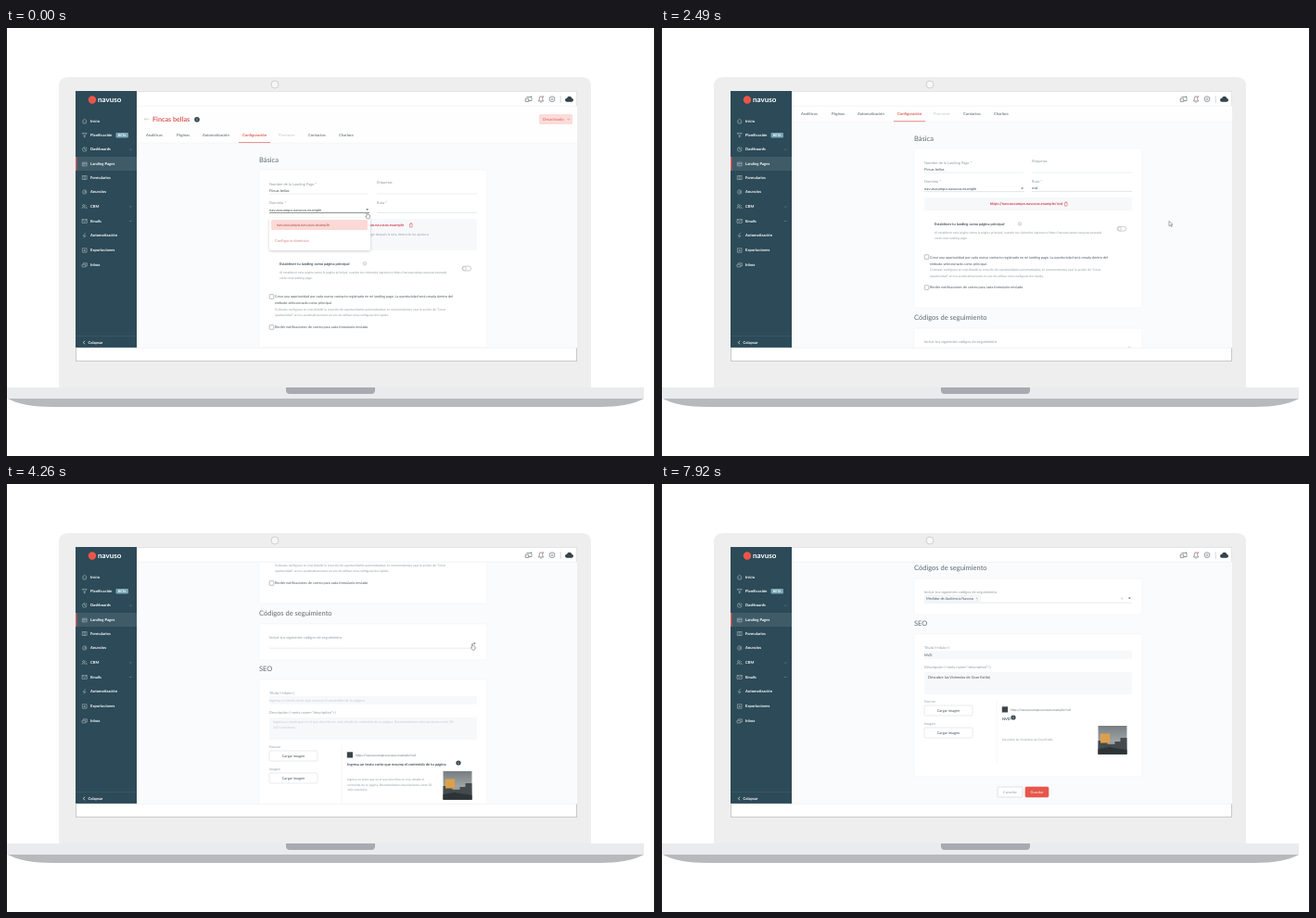
An HTML page for the animation above (8 s loop, 700 px wide and 462 px high).

```html
<!DOCTYPE html>
<html lang="es">
<head>
<meta charset="utf-8">
<style>
html, body { margin: 0; width: 100%; height: 100%; overflow: hidden; background: #fff }
svg { display: block; font-family: Lato, "Open Sans", sans-serif; text-rendering: geometricPrecision }
text { white-space: pre }
</style>
</head>
<body>
<svg id="stage" width="700" height="462" viewBox="0 0 700 462"></svg>
<script>
const RED = '#df5a55', INK = '#4a555c', GREY = '#929ba1', PALE = '#c3cad0';
const HOST = 'navusocampo.navusos.example', SITE = 'https://' + HOST;
const PROJECT = 'Fincas bellas', PATH = 'nvd', TITLE = 'NVD';
const TRACKER = 'Medidor de Audiencia Navuso';
const PITCH = 'Descubre las Viviendas de Gran Estilo';
const TITLE_HINT = 'Ingresa un texto corto que resuma el contenido de tu página';

const esc = s => s.replace(/&/g, '&amp;').replace(/</g, '&lt;');
// y is the vertical middle of the line
const text = (x, y, s, size = 3.9, fill = INK, more = '') =>
  `<text x="${x}" y="${y + size * .34}" font-size="${size}" fill="${fill}" ${more}>${esc(s)}</text>`;
const rect = (x, y, w, h, fill, more = '') =>
  `<rect x="${x}" y="${y}" width="${w}" height="${h}" fill="${fill}" ${more}/>`;
const line = (d, color = GREY, w = .6, more = '') =>
  `<path d="${d}" fill="none" stroke="${color}" stroke-width="${w}" ${more}/>`;
const dot = (x, y, r, fill, more = '') => `<circle cx="${x}" cy="${y}" r="${r}" fill="${fill}" ${more}/>`;
const group = (id, body) => `<g id="${id}">${body}</g>`;
const card = (y, h, id = '') => rect(273, y, 246, h, '#fff', `id="${id}" rx="2" stroke="#f1f3f5" stroke-width=".6"`);
const arrow = (x, y) => `<path d="M${x - 1.4} ${y - .7}h2.8l-1.4 1.7z" fill="#5c666c"/>`;
const info = (x, y, r, id = '') => `<g id="${id}">${dot(x, y, r, '#34454e')}${line(`M${x} ${y - .2}v1.4M${x} ${y - 1.4}v.6`, '#fff', .7)}</g>`;
const check = y => rect(284.2, y - 2.3, 4.6, 4.6, '#fff', 'rx=".6" stroke="#8b959b" stroke-width=".6"');
const button = (x, y, w, s, fill, color, edge) =>
  rect(x, y, w, 11, fill, `rx="1.2" stroke="${edge}" stroke-width=".6"`) +
  text(x + w / 2, y + 5.5, s, 3.9, color, 'text-anchor="middle"');
const bold = 'font-weight="700"', mid = 'text-anchor="middle"';

function laptop() {
  return rect(0, 0, 1, 462, '#111') + rect(699, 0, 1, 462, '#111') +
    `<path d="M57 388V63q0-10 10-10H621q10 0 10 10V388z" fill="#eeeeef"/>` +
    dot(290, 61, 4, '#f7f7f7', 'stroke="#c9cbcd" stroke-width=".9"') +
    rect(75.5, 68.5, 540, 291, '#fff', 'stroke="#c7cacd" stroke-width="1"') +
    rect(1, 388, 687, 12, '#e9ebed') +
    `<path d="M2 400H688Q672 409 640 409H50Q18 409 2 400z" fill="#b7babd"/>` +
    `<path d="M302 388h96v3q0 4-4 4H306q-4 0-4-4z" fill="#a7abb1"/>`;
}

function sidebar() {
  const items = [
    [100.5, 'Inicio', 'M-2.5 0L0-2.4 2.5 0M-1.7-.5V2.4H1.7V-.5'],
    [115.5, 'Planificación', 'M-2.5-2H2.5L.4.4V2.4H-.4V.4z'],
    [131, 'Dashboards', 'M0-2.3A2.3 2.3 0 1 0 2.3 0H0zM1-2.4Q2.3-2 2.4-1', 1],
    [147, 'Landing Pages', 'M-2.4-1.9H2.4V1.9H-2.4zM-2.4-.6H2.4M-.6-.6V1.9'],
    [161.5, 'Formularios', 'M-2.4-2H2.4V2H-2.4zM-1.2-.7H1.2M-1.2.7H1.2'],
    [177, 'Anuncios', 'M-2.2 0A2.2 2.2 0 1 0 2.2 0A2.2 2.2 0 1 0-2.2 0M-.9.6L.9-.8V1'],
    [193, 'CRM', 'M-2.6 2Q-2.6 0-1 0T.6 2M-2-1.4A1 1 0 1 0 0-1.4A1 1 0 1 0-2-1.4M1-2.2Q2.4-1.3 1-.5M1.4.2Q2.7.6 2.7 2', 1],
    [208.5, 'Emails', 'M-2.6-1.9H2.6V1.9H-2.6zL0 .4 2.6-1.9', 1],
    [224, 'Automatización', 'M.8-2.6L-1.4.4H1.2L-.8 2.6'],
    [240, 'Exportaciones', 'M-2.3-2.2H2.3V2.2H-2.3zM0-1.2V1M-1 0L0 1 1 0'],
    [256, 'Inbox', 'M-2.7 1.9V-.8H1V1.9zM-1.2-.8V-2.2H2.7V1H1']
  ];
  return rect(75, 68, 66, 277, '#2c4a58') + rect(75, 139, 66, 15, '#405b68') + rect(75, 139, 1.3, 15, RED) +
    dot(93, 77.5, 4.2, '#ea5547') + text(99, 77, 'navuso', 8, '#fff', bold) +
    items.map(([y, s, d, more]) =>
      line(d, '#9fb3bb', .65, `transform="translate(84.7 ${y})"`) + text(91, y, s, 4.15, '#fff', bold) +
      (more ? line(`M133.2 ${y - .5}l1 1 1-1`, '#91a5ae', .5) : '')).join('') +
    rect(118.5, 113, 13.5, 5.4, '#76a4b2', 'rx="1"') + text(125.2, 115.7, 'BETA', 3.6, '#fff', bold + mid.padStart(30)) +
    line('M75 332.5H141', '#45616d', .5) + line('M85 337.7l-1.6 1.8 1.6 1.8', '#fff', .7) +
    text(88.5, 339.5, 'Colapsar', 4.1, '#fff', bold);
}

function topbar() {
  return rect(141, 68.5, 474.5, 15.5, '#fff') + line('M141 84.2H615.5', '#eceff1', .7) +
    line('M561.5 74.5h5.5v4h-3.2M560.2 76.2h3.6v3.2h-3.6zM566 73.8h1', '#687278', .7) +
    line('M574.3 79h5.4q-1-1-1-3t-1.7-2.2-1.7 2.2-1 3M576.3 80.2h1.4', '#687278', .7) + dot(579.2, 74, .8, RED) +
    dot(589, 76.7, 2.9, 'none', 'stroke="#7c858a" stroke-width=".8"') + dot(589, 76.7, 1, 'none', 'stroke="#7c858a" stroke-width=".6"') +
    line('M598.2 73V81', '#aab2b7', .5) +
    `<path d="M605 79.7q-2-.1-2-2t2-1.9q.6-2.1 2.7-2.1t2.6 2.1q1.7.3 1.7 2t-1.9 1.9z" fill="#34424a"/>`;
}

function heading() {
  const tabs = [[151, 'Analíticas'], [184, 'Páginas'], [212, 'Automatización'], [255, 'Configuración', RED],
    [294, 'Promover', PALE], [326, 'Contactos'], [359, 'Charlora']];
  return rect(141, 84, 475, 40, '#fefefe') + line('M141 124.2H616', '#f3f5f6', .6) +
    line('M154.5 98.3h-5l1.6-1.6m-1.6 1.6l1.6 1.6', '#aab2b7', .5) +
    text(158, 98.5, PROJECT, 7.2, RED, bold) + info(206, 98.8, 2.8) +
    rect(575, 93, 36, 11, '#fbdcd9', 'rx="1.5"') + text(579, 98.5, 'Desactivada', 4.2, RED) +
    line('M605.5 98l1.2 1.2 1.2-1.2', RED, .5) +
    tabs.map(([x, s, c = '#566168']) => text(x, 115.5, s, 4.2, c, c == RED ? bold : '')).join('') +
    line('M251 123.6H285', RED, .7);
}

function basics() {
  return text(273, 142, 'Básica', 7.5, '#5d6970') + card(153, 172, 'card') +
    text(284, 168.3, 'Nombre de la Landing Page *', 4.05, GREY) + text(284, 175.3, PROJECT, 3.9) +
    text(400, 167, 'Etiquetas', 4.05, GREY) + line('M284 179H391M400 179H508', '#d9dee1', .5) +
    text(284, 189, 'Dominio *', 4.05, GREY) + text(284, 196.2, HOST, 4.1) + arrow(389.6, 196) +
    text(400, 188.8, 'Ruta *', 4.05, GREY) + text(400, 195.6, '', 3.9, INK, 'id="path"') +
    line('M284 199.5H392', '#59646a', .7, 'id="hostLine"') + line('M400 199.3H508', '#59646a', .7, 'id="pathLine"') +
    rect(284, 206, 224, 14, '#f7f8fa', 'id="urlBox" rx="1"') +
    text(394, 213, '', 4.1, '#d4485a', `id="url" ${mid} ${bold}`) +
    line('M435.5 211.4h2.6v3.6h-2.6zM436.2 210.6h1.2v.8', '#d4485a', .5) +
    group('hint', text(288, 223, 'También puedes conectar un dominio propio a esta página, así como elegir después la ruta, dentro de los ajustes o', 3.4, GREY) +
      text(288, 229, 'de la cuenta.', 3.4, GREY));
}

function options() {
  return text(295, 235, 'Establecer tu landing como página principal', 3.95, INK, bold) +
    dot(387, 234.3, 1.7, 'none', 'stroke="#9aa3a8" stroke-width=".5"') + line('M387 233.5v1.7', GREY, .4) +
    text(295, 243.8, 'Al establecer esta página como la página principal, cuando tus visitantes ingresen a ' + SITE, 3.4, GREY) +
    text(295, 249.8, 'verán esta landing page.', 3.4, GREY) +
    rect(492, 237.2, 9.6, 4.8, '#fff', 'rx="2.4" stroke="#a3abb0" stroke-width=".6"') + dot(494.5, 239.6, 1.9, '#fff', 'stroke="#a3abb0" stroke-width=".5"') +
    check(270) + text(290, 270.2, 'Crear una oportunidad por cada nuevo contacto registrado en mi landing page. La oportunidad será creada dentro del', 3.75) +
    text(290, 277.2, 'embudo seleccionado como principal.', 3.75) +
    text(290, 283.8, 'Si deseas configurar en más detalle la creación de oportunidades automatizadas, te recomendamos usar la acción de "Crear', 3.45, GREY) +
    text(290, 290.3, 'oportunidad" en tus automatizaciones en vez de utilizar esta configuración rápida.', 3.45, GREY) +
    check(303) + text(290, 303, 'Recibir notificaciones de correo para cada formulario enviado', 3.75);
}

function tracking() {
  return text(273, 335, 'Códigos de seguimiento', 7.5, '#5d6970') + card(347, 39) +
    text(284, 362, 'Incluir tus siguientes códigos de seguimiento', 4, GREY) +
    line('M284 373.2H508', '#d9dee1', .6, 'id="tagLine"') + arrow(505.3, 368.3) +
    group('tag', rect(284.3, 365.5, 60, 6.2, '#f7f8fa', 'rx="1" stroke="#dbe0e3" stroke-width=".4"') +
      text(286, 368.5, TRACKER, 3.9) + text(339.5, 368.3, '×', 4.4, GREY) + text(496, 368.3, '×', 4.4, GREY)) +
    line('M346 366v5', INK, .5, 'id="tagCaret"');
}

function seo() {
  const about = ['Ingresa un texto que en el que describas en más detalle el', 'contenido de tu página. Recomendamos descripciones entre 50-', '160 caracteres.'];
  return text(273, 395, 'SEO', 7.5, '#5d6970') + card(407, 154) +
    text(284, 422, 'Título (<título>)', 3.95, GREY) + rect(284, 425, 224, 9, '#f7f8fa', 'rx="1"') +
    text(284, 429.5, '', 3.9, INK, 'id="title"') +
    text(284, 442.5, 'Descripción (<meta name="description">)', 3.95, GREY) + rect(284, 448, 224, 24, '#f7f8fa', 'rx="1"') +
    group('descHint', text(288, 453, 'Ingresa un texto que en el que describa en más detalle el contenido de tu página. Recomendamos descripciones entre 50-', 3.7, PALE) +
      text(288, 459, '160 caracteres.', 3.7, PALE)) +
    text(288, 453.5, '', 4, INK, 'id="desc"') +
    text(284, 480, 'Favicon', 3.7, GREY) + button(284, 484, 52, 'Cargar imagen', '#fff', INK, '#d9dee1') +
    text(284, 504, 'Imagen', 3.7, GREY) + button(284, 508, 52, 'Cargar imagen', '#fff', INK, '#d9dee1') +
    line('M362 478V547', '#eef1f3', .7) +
    rect(367.8, 485.3, 6.2, 6.2, '#3b4348') + text(377, 488.5, SITE + '/' + PATH, 3.45, '#6c767c') +
    text(368, 498.8, '', 4, INK, `id="shown" ${bold}`) + info(380, 497, 2.6, 'badge') +
    group('about', about.map((s, i) => text(368, 514.8 + 5.7 * i, s, 3.3, GREY)).join('')) +
    text(368, 520.4, '', 3.3, GREY, 'id="pitch"') +
    photo() +
    button(363, 572, 27, 'Cancelar', '#fff', GREY, '#ccd2d6') + button(393, 572, 25, 'Guardar', '#e7574c', '#fff', '#e7574c');
}

function photo() {
  return rect(471.5, 506, 31, 30.7, 'url(#sky)') +
    `<path d="M471.5 536.7V522h5v-5h5v9h8v-3h6v-4h7v17.7z" fill="#444a4d"/>` +
    `<path d="M471.5 536.7V531l12-2 19 3v4.7z" fill="#2d3437"/>` + rect(474, 514.5, 10, 10, '#dca04c');
}

function menu(id, y, first, second) {
  return group(id, rect(284, y, 109, second ? 35 : 16, '#fff', 'rx="1.5" filter="url(#soft)"') +
    rect(286, y + 2, 104, 11, '#fad9d6', 'rx="1.5"') + text(292, y + 7.4, first, 4.15, '#b2514c') +
    (second ? text(290, y + 25, second, 4.15, '#d58c86') : ''));
}

stage.innerHTML = `<defs><clipPath id="view"><rect x="141" y="84" width="475" height="261"/></clipPath>
  <linearGradient id="sky" x2="0" y2="1"><stop stop-color="#777e82"/><stop offset=".55" stop-color="#a0a4a4"/><stop offset="1" stop-color="#565c5e"/></linearGradient>
  <filter id="soft" x="-10%" y="-20%" width="120%" height="150%"><feDropShadow dx="0" dy="1" stdDeviation="1.5" flood-opacity=".2"/></filter></defs>` +
  laptop() + `<g clip-path="url(#view)">` + rect(141, 84, 475, 261, '#fafbfc') +
  group('page', heading() + basics() + group('low', options() + tracking() + seo()) +
    menu('hostMenu', 205, HOST, 'Configurar dominios') + menu('tagMenu', 375, TRACKER)) + '</g>' +
  topbar() + sidebar() + line('M75 345.3H616', '#e6e9eb', .5) +
  group('pointer', `<path id="arrowTip" d="M0 0V5.4L1.4 4.2 2.4 6.2 3.3 5.7 2.4 3.8H4z" fill="#fff" stroke="#555" stroke-width=".5"/>
    <path id="hand" d="M1 3V.5q.6-.8 1.1 0V2.4L4.4 3V5.5L3.7 7H1.6L-.2 4.4Q0 3.6 1 4.4z" fill="#fff" stroke="#555" stroke-width=".5"/>`);

const $ = id => document.getElementById(id);
const show = (id, on) => $(id).style.display = on ? '' : 'none';
const set = (id, name, v) => $(id).setAttribute(name, v);
const write = (id, s) => { if ($(id).textContent != s) $(id).textContent = s };
const between = (t, a, b) => t >= a && t < b;
const typed = (s, t, start, step) => s.slice(0, Math.max(0, Math.floor((t - start) / step) + 1));

// keys: [time, ...values]
function along(keys, t, ease = k => k) {
  const i = keys.findIndex(k => k[0] > t);
  if (i == 0) return keys[0].slice(1);
  if (i < 0) return keys[keys.length - 1].slice(1);
  const a = keys[i - 1], b = keys[i], k = ease((t - a[0]) / (b[0] - a[0]));
  return a.slice(1).map((v, j) => v + (b[j + 1] - v) * k);
}
const smooth = k => k * k * (3 - 2 * k);

const scrollKeys = [[2340, 0], [2940, 91], [3540, 151], [3930, 196], [5230, 196], [5570, 245]];
const moveKeys = [[0, 388, 199], [350, 345, 211], [650, 345, 211], [1100, 403, 193], [1600, 403, 193],
  [1940, 549.5, 209], [2340, 549.5, 209], [2600, 547, 208], [3940, 547, 208], [4300, 500, 171], [4450, 500, 171],
  [4700, 335, 186], [4900, 335, 186], [5220, 511, 225], [5500, 300, 184], [6990, 300, 184], [7180, 310, 208]];

function draw(t) {
  const early = t < 1300;
  set('page', 'transform', `translate(0 ${-along(scrollKeys, t)[0]})`);
  set('low', 'transform', `translate(0 ${early ? 20 : 0})`);
  set('card', 'height', early ? 192 : 172);
  set('urlBox', 'height', early ? 34 : 14);
  show('hint', early);
  show('hostMenu', t < 600);

  const path = typed(PATH, t, 1300, 110);
  write('path', path + (between(t, 1100, 1650) ? '|' : ''));
  write('url', SITE + (path && '/' + path));
  set('hostLine', 'stroke', t < 1100 ? '#59646a' : '#d9dee1');
  set('pathLine', 'stroke', between(t, 1100, 2340) ? '#59646a' : '#d9dee1');

  const tagFocus = between(t, 4350, 5500);
  show('tagMenu', between(t, 4400, 4850));
  show('tag', t >= 4850);
  show('tagCaret', tagFocus && t >= 4850);
  set('tagLine', 'stroke', tagFocus ? '#59646a' : '#d9dee1');

  const title = t < 6180 ? '' : t < 6660 ? TITLE[0] : t < 6750 ? TITLE.slice(0, 2) : TITLE;
  const caret = between(t, 5530, 6030) || between(t, 6180, 6510) || between(t, 6660, 7180) ? '|' : '';
  write('title', title ? title + caret : caret + TITLE_HINT + '.');
  set('title', 'fill', title ? INK : PALE);
  write('shown', title || TITLE_HINT);
  set('badge', 'transform', `translate(${title ? 0 : 108} 0)`);

  const desc = typed(PITCH, t, 7250, 17);
  write('desc', desc + (t >= 7180 ? '|' : ''));
  write('pitch', desc);
  show('descHint', !desc);
  show('about', !desc);

  const [x, y] = along(moveKeys, t, smooth);
  const hand = t < 700 || between(t, 4250, 5400);
  set('pointer', 'transform', `translate(${x} ${y})`);
  show('pointer', t < 6000 || between(t, 6990, 7250));
  show('hand', hand);
  show('arrowTip', !hand);
}

const start = performance.now();
function tick() {
  draw((performance.now() - start) % 8000);
  requestAnimationFrame(tick);
}
tick();
</script>
</body>
</html>
```
